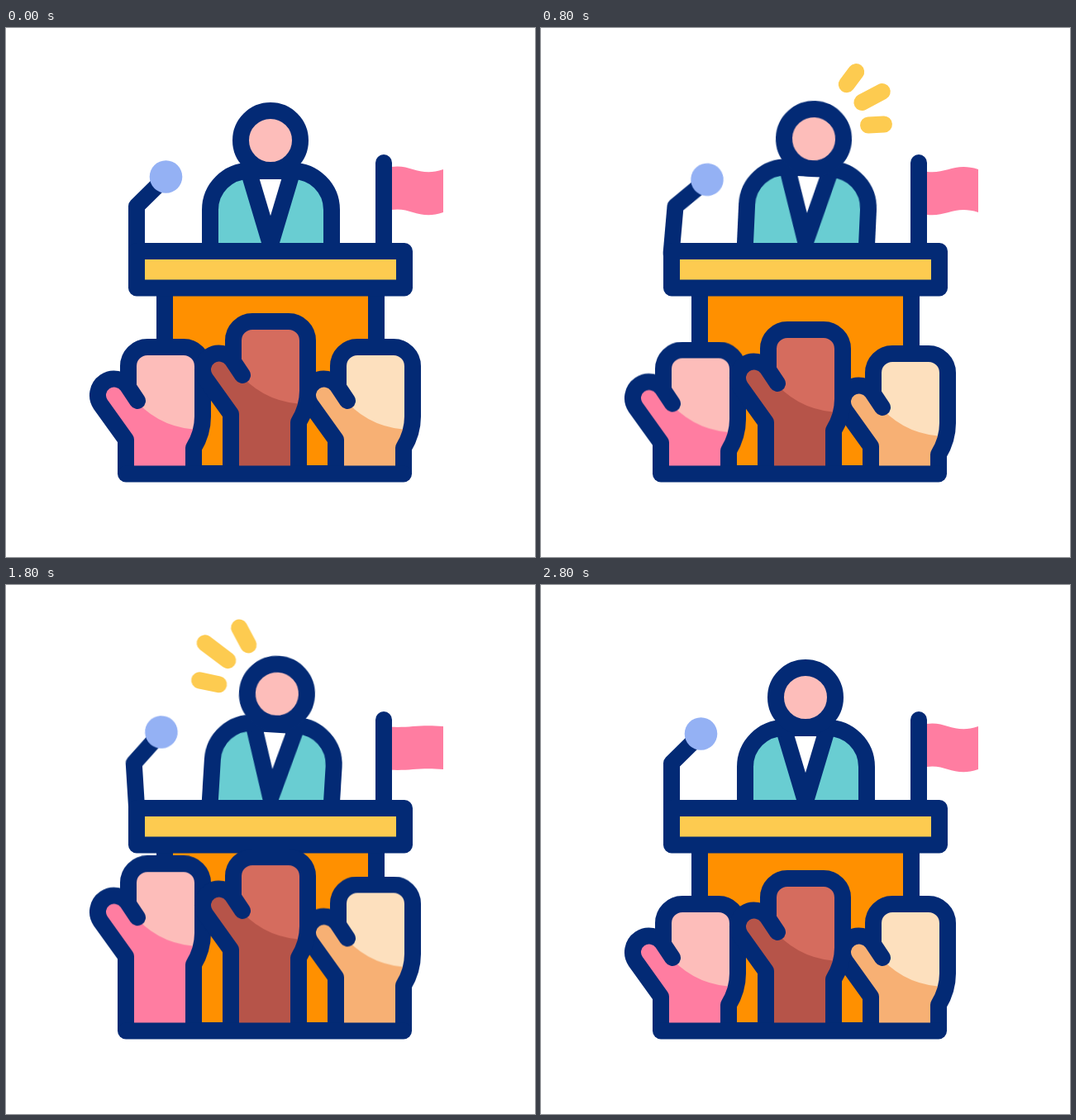
These frames come from a looping animation (640x640 px, 2.84 s). An HTML page:

```html
<!DOCTYPE html>
<html lang="en">
<head>
<meta charset="utf-8">
<title>Speaker at a podium</title>
<style>
  html, body { margin: 0; width: 100%; height: 100%; overflow: hidden; background: #fff; }
  svg { display: block; width: 100vw; height: 100vh; }
  .ink { stroke: #032a75; stroke-width: 20; stroke-linecap: round; stroke-linejoin: round; }
  .burst { fill: none; stroke: #fdcb50; stroke-width: 20; stroke-linecap: round; opacity: 0; }
  #body { transform-origin: 320px 265px; }
  #mic { transform-origin: 158px 268px; }
</style>
</head>
<body>
<svg viewBox="0 0 640 640">
  <defs><clipPath id="floor"><rect width="640" height="540"/></clipPath></defs>

  <g id="bursts"></g>

  <g id="body">
    <path fill="#69cdd2" d="M247 275V220A47 47 0 0 1 294 173H346A47 47 0 0 1 394 220V275Z"/>
    <path fill="#fff" d="M295 175H345L320 262Z"/>
    <path class="ink" fill="none" d="M294 175L320 262L346 175"/>
    <path class="ink" fill="none" d="M247 272V220A47 47 0 0 1 294 173H346A47 47 0 0 1 394 220V272"/>
    <circle id="head" class="ink" fill="#fdbdba" cx="320" cy="136" r="36"/>
  </g>

  <g id="mic">
    <path class="ink" fill="none" d="M158 272V215.500L193 181"/>
    <circle fill="#94b1f4" cx="193.500" cy="180" r="19.800"/>
  </g>

  <path id="flag" fill="#ff7da1"/>
  <path class="ink" d="M457 163V270"/>

  <rect class="ink" fill="#ff9000" x="192" y="314" width="256" height="225"/>
  <rect class="ink" fill="#fdcb50" x="158" y="270" width="324" height="44.500"/>

  <g id="hands" clip-path="url(#floor)"></g>
  <path class="ink" d="M145 539.500H481"/>
</svg>

<script>
const LOOP = 2840, BEAT = 350, BEATS = 8;
const $ = id => document.getElementById(id);

function add(parent, markup) {
  parent.insertAdjacentHTML('beforeend', markup);
  return parent.lastElementChild;
}

// frames: [time in ms, CSS properties]; the last pose holds to the end of the loop
function run(el, frames, easing) {
  const keys = frames.map(([t, props]) => ({ offset: t / LOOP, easing, ...props }));
  keys.unshift({ ...keys[0], offset: 0 });
  keys.push({ ...keys.at(-1), offset: 1 });
  el.animate(keys, { duration: LOOP, iterations: Infinity });
}

// One pose per beat, eased between; missing poses are at rest, the last leads back to the first
function dance(el, poses, toProps) {
  const frames = Array.from({ length: BEATS + 1 },
    (_, i) => [i * BEAT, toProps(poses[i % BEATS] ?? 0)]);
  run(el, frames, 'ease-in-out');
}

const move = (x, y) => ({ transform: `translate(${x}px, ${y}px)` });
const turn = a => ({ transform: `rotate(${a}deg)` });
const lean = a => ({ transform: `translate(0px, ${-1.3 * a}px) rotate(${a}deg)` });
const nod = x => move(x, 0.3 * Math.abs(x));

dance($('body'), [0, -2.4, 3.2, 0, 0, 3.5, 3.5, 3.5], lean);
dance($('head'), [0, -5, 5], nod);
dance($('mic'), [0, -10.2, 5.5, 2.5, 0, -3.7, -1], turn);

// Flag: the wave w swings between 1 and -1
const wave = w => {
  const a = 171 - 3 * w, b = 171 - 7 * w, c = 171 + 10 * w;
  return `M466 ${a}C490 ${b} 500 ${c} 529 171V223C500 ${c + 52} 490 ${b + 52} 466 ${a + 52}Z`;
};
run($('flag'), [1, -1, 1, -1, 1].map((w, i) => [i * 2 * BEAT, { d: `path("${wave(w)}")` }]),
  'ease-in-out');

// Raised hands
function hand(x, dark, light, heights) {
  const palm = 'V409A23 23 0 0 1 171 386H215A23 23 0 0 1 238 409V';
  const thumb = 'M159 451L147 433A19.500 19.500 0 1 0 114.500 455.500L145 498V640';
  const g = add($('hands'), `<g transform="translate(${x} 0)"><g>
    <path fill="${dark}" d="${thumb}H227V508Q238 490 238 470Z"/>
    <path fill="${light}" d="M159 451L148 434${palm}486Q190 486 159 453Z"/>
    <path class="ink" fill="none" d="${thumb}M148 434${palm}470Q238 490 227 508V640"/>
  </g></g>`);
  dance(g.firstElementChild, heights, y => move(0, y));
}
hand(254, '#f7b074', '#fde0be', [0, -27, 8, 8, -23.5, -23.5, -23.5, -12]);
hand(0, '#ff7da1', '#fdbdba', [0, -47, 3.5, 3.5, 0.5, -51, 0.5]);
hand(127, '#b65449', '#d56c5e', [-31, -26.5, -21, -21, 12, -60, 12, -10]);

// Speech strokes: a fan around the head that grows outwards, then runs out
function burst(start, x, y, side, tilt) {
  const g = add($('bursts'),
    `<g class="burst" transform="translate(${x} ${y}) scale(${side} 1)"></g>`);
  run(g, [[0, { opacity: 0 }], [start, { opacity: 1 }], [start + 360, { opacity: 0 }]],
    'steps(1, end)');

  const trim = (t, from, to) => [start + t,
    { strokeDasharray: `${to - from} 2`, strokeDashoffset: `${-from}` }];
  for (let i = 0; i < 3; i++) {
    const length = i === 1 ? 48 : 33;
    const ray = add(g,
      `<path pathLength="1" transform="rotate(${tilt + 25 * i})" d="M0-66v${-length}"/>`);
    run(ray, [trim(0, 0, 0.001), trim(80, 0, 0.57), trim(140, 0.21, 1), trim(360, 1, 1.001)],
      'linear');
  }
}
burst(240, 308.5, 141.5, -1, 28);
burst(720, 330, 121, 1, 37);
burst(1680, 326.5, 135, -1, 28);
burst(2240, 328, 121, 1, 37);
</script>
</body>
</html>
```
